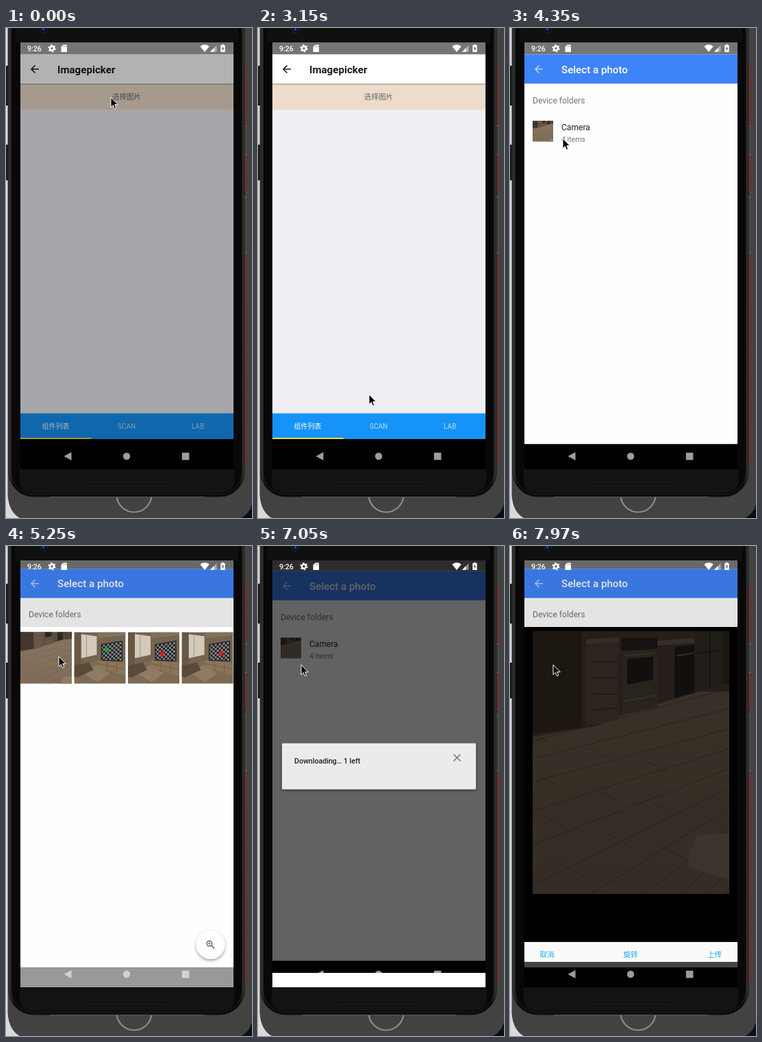
Recreate the animation shown at these times as an HTML page. Size 359 px wide and 714 px high, loop 8 s.

```html
<!DOCTYPE html>
<html lang="zh-CN">
<head>
<meta charset="utf-8">
<title>Image picker</title>
<style>
  html, body { margin: 0; width: 100%; height: 100%; overflow: hidden; background: #404040; }
  svg { display: block; width: 100%; height: 100%; }
  text { font: 12.1px Roboto, "Noto Sans CJK SC", "Noto Sans CJK", sans-serif; }
  .small { font-size: 10.6px; }
  .tab { font-size: 10px; }
  .mid { text-anchor: middle; }
  .bold { font-weight: 500; }
  .title { font-size: 15.14px; font-weight: 500; }
</style>
</head>
<body>
<svg viewBox="0 0 359 714">
  <defs>
    <clipPath id="screenClip"><rect x="21" y="21" width="311" height="622"/></clipPath>
    <clipPath id="reveal"><rect id="revealRect" x="21" y="21" width="311" height="622"/></clipPath>
    <clipPath id="rowClip"><rect x="21" y="123" width="311" height="58"/></clipPath>
    <clipPath id="sheetClip"><rect x="21" y="81" width="311" height="518"/></clipPath>
    <filter id="shadow" x="-30%" y="-30%" width="160%" height="170%">
      <feDropShadow dx="0" dy="2" stdDeviation="2.2" flood-opacity=".4"/>
    </filter>
    <pattern id="checker" width="6" height="6" patternUnits="userSpaceOnUse" patternTransform="skewY(-8)">
      <rect width="6" height="6" fill="#16171a"/>
      <path d="M0 0h3v6h3v-3h-6z" fill="#8b8c8e"/>
    </pattern>
    <linearGradient id="floorTone" x2="0" y2="1">
      <stop offset=".3" stop-color="#85735f"/><stop offset="1" stop-color="#7d6b58"/>
    </linearGradient>
    <symbol id="kitchen" viewBox="0 0 287 383">
      <rect width="287" height="383" fill="url(#floorTone)"/>
      <path id="planks" fill="none" stroke="#6a5a49" stroke-width="1.4"/>
      <path d="M227 330L240 298L287 295V362L228 345Z" fill="#8d7c69"/>
      <path d="M0 0H287V88L245 88L210 98L130 122L95 138L0 154Z" fill="#5c4b3c"/>
      <path d="M0 0H72V140L0 150Z" fill="#45362b"/>
      <path d="M78 12H126V129L90 137L78 135Z" fill="#6a5847"/>
      <path d="M90 45H124M90 68H124M90 92H124M90 115L124 112M23 0V148M50 0V144" stroke="#483a2e" stroke-width="1.6"/>
      <path d="M78 12L126 9V16L78 19ZM182 14L240 10V17L182 21Z" fill="#7d6e5c"/>
      <path d="M130 12H182V111L130 122Z" fill="#5f5346"/>
      <path d="M130 10H182V26L130 29Z" fill="#332e29"/>
      <path d="M138 41L176 37V71L138 78ZM207 23L243 19V87L207 98Z" fill="#2b2722"/>
      <path d="M134 36L179 32M133 102L180 94M210 36L241 31" stroke="#85786a" stroke-width="1.6"/>
      <path d="M236 0H278V78L236 89Z" fill="#4f453a"/>
      <path d="M259 0V83M238 32L277 28" stroke="#332b24" stroke-width="1.6"/>
      <path d="M278 0H287V78H278Z" fill="#443529"/>
    </symbol>
    <symbol id="lounge" viewBox="0 0 75 75">
      <rect width="75" height="75" fill="#75654f"/>
      <path d="M0 0H75V4L34 9V0Z" fill="#82725e"/>
      <path d="M10 3L33 6V33L10 38Z" fill="#d3cabc"/>
      <path d="M18 4V37" stroke="#a59884"/>
      <path d="M0 0H10V48L0 52Z" fill="#685744"/>
      <path d="M0 52L34 41L75 61V75H0Z" fill="#7c6a55"/>
      <path d="M12 59L32 48L52 60L34 73Z" fill="#8d7b66"/>
      <path d="M0 49L22 44L28 55L5 66L0 65Z" fill="#5b4a3a"/>
      <path d="M34 41L75 45V64L34 51Z" fill="#8b7558"/>
      <path d="M34 46L75 54M48 43V56M62 44V60" stroke="#6b5842" stroke-width=".8"/>
      <path d="M40 18L70 13V42L40 41Z" fill="url(#checker)" stroke="#1d1b1a"/>
    </symbol>
    <path id="arrow" d="M6 0H-5M.5 -5.5L-5 0L.5 5.5" fill="none" stroke-width="1.6"/>
    <path id="cross" d="M-5 -5L5 5M5 -5L-5 5" fill="none" stroke-width="1.5"/>
    <linearGradient id="edge">
      <stop stop-color="#3a3a3a"/><stop offset=".02" stop-color="#0a0a0a"/>
      <stop offset=".98" stop-color="#0a0a0a"/><stop offset="1" stop-color="#3a3a3a"/>
    </linearGradient>
  </defs>

  <!-- Device -->
  <g id="device">
    <rect width="359" height="714" fill="#424242"/>
    <path d="M0 0H2.5V680Q4 705 20 714H0Z" fill="#d9d9dc"/>
    <path d="M0 55H3V113H0ZM0 170H3V222H0Z" fill="#1c1c1c"/>
    <path d="M359 694Q355 708 343 714H359Z" fill="#071214"/>
    <path d="M350 56V240M350 330V636" stroke="#a51c1c" stroke-width="1.4"/>
    <path d="M349.5 142V185M349.5 246V328" stroke="#777" stroke-width="3"/>
    <path d="M349.5 143V184M349.5 247V327" stroke="#292929" stroke-width="1.6"/>
    <circle cx="349" cy="241" r="2" fill="#222" stroke="#777" stroke-width=".7"/>
    <circle cx="187" cy="680" r="25.5" fill="none" stroke="#8b8b8b" stroke-width="2.2"/>
    <rect x="4" y="-60" width="344" height="743" rx="36" fill="url(#edge)" stroke="#1a1a1a"/>
    <path d="M64 683.3H290" stroke="#686868" stroke-width=".8"/>
    <rect x="7.5" y="-60" width="337" height="739" rx="32" fill="#080808" stroke="#2a2a2a" stroke-width=".8"/>
    <path d="M20 643H333V664Q331 676 314 677H39Q22 676 20 664Z" fill="#131313"/>
    <path d="M14 0H339V21H14Z" fill="#101010"/>
    <rect x="113" y="662" width="125" height="5" rx="2.5" fill="#0d0d0d" stroke="#252525" stroke-width=".8"/>
    <path d="M117 664.5H235" stroke="#262626" stroke-dasharray="1 1"/>
    <circle cx="55" cy="2" r="5.5" fill="#0b1020" stroke="#20263a"/>
    <circle cx="54.5" cy="2" r="2" fill="#27408c"/>
  </g>

  <g clip-path="url(#screenClip)">
    <g id="picker">
      <rect x="21" y="0" width="311" height="38.5" fill="#757575"/>
      <rect x="21" y="38.5" width="311" height="561" fill="#efeef3"/>
      <rect x="21" y="38.5" width="311" height="42.5" fill="#fff"/>
      <use href="#arrow" x="42" y="60" stroke="#1c1c1c"/>
      <text class="title" style="font-weight:700" x="75" y="66" fill="#1c1c1c">Imagepicker</text>
      <rect x="21" y="81" width="311" height="38" fill="#eddccb"/>
      <rect x="21" y="81" width="311" height="1.5" fill="#000" opacity=".25"/>
      <text class="small mid" x="176" y="104" fill="#666">选择图片</text>
      <rect x="21" y="561.5" width="311" height="37.5" fill="#1593f8"/>
      <rect x="21" y="597" width="103.5" height="2" fill="#f0e030"/>
      <text class="tab mid" x="72.5" y="584" fill="#fff">组件列表</text>
      <text class="tab mid" x="176" y="584" fill="#fff" opacity=".7">SCAN</text>
      <text class="tab mid" x="280" y="584" fill="#fff" opacity=".7">LAB</text>
      <rect x="21" y="599" width="311" height="60"/>
      <g id="modal">
        <rect x="21" y="38.5" width="311" height="560.5" opacity=".3"/>
        <g clip-path="url(#sheetClip)"><g id="sheet">
          <rect x="21" y="389.5" width="311" height="210" fill="#fff"/>
          <rect x="21" y="552" width="311" height="6.5" fill="#f1f1f1"/>
          <text class="small mid" x="176" y="416" fill="#ccc">上传图片</text>
          <text class="mid" x="176" y="458.5" fill="#ff8f1f">删除</text>
          <text class="mid" x="176" y="497.5" fill="#555">拍照</text>
          <text class="mid" x="176" y="537" fill="#555">从图库上传</text>
          <text class="mid" x="176" y="584" fill="#555">取消</text>
        </g></g>
      </g>
    </g>

    <g id="folders">
      <rect x="21" y="0" width="311" height="39" fill="#757575"/>
      <rect x="21" y="38.5" width="311" height="568" fill="#fefefe"/>
      <rect x="21" y="38.5" width="311" height="42.5" fill="#3f83f8"/>
      <use href="#arrow" x="42" y="60" stroke="#fff" opacity=".65"/>
      <text class="title" x="75" y="65.5" fill="#fff">Select a photo</text>
      <text x="33" y="109.6" fill="#757575">Device folders</text>
      <svg x="33" y="135.5" width="30" height="30" viewBox="0 0 287 287"><use href="#kitchen" y="-48" width="287" height="383"/></svg>
      <text x="75" y="148.6" fill="#212121">Camera</text>
      <text class="small" x="75" y="166" fill="#757575">4 items</text>
      <circle id="ripple" cx="78" cy="162" opacity=".1" clip-path="url(#rowClip)"/>
      <rect x="21" y="606.5" width="311" height="60"/>
    </g>

    <g id="dialog">
      <rect x="21" y="21" width="311" height="622" opacity=".61"/>
      <rect x="35" y="287.5" width="283" height="67" rx="1" fill="#ebebeb" filter="url(#shadow)"/>
      <text class="small bold" x="53" y="316.8" fill="#212121">Downloading… 1 left</text>
      <use href="#cross" x="290.5" y="308.5" stroke="#757575"/>
    </g>

    <g id="grid">
      <rect x="21" y="0" width="311" height="39"/>
      <rect x="21" y="38.5" width="311" height="568" fill="#fefefe"/>
      <rect x="21" y="38.5" width="311" height="42.5" fill="#3f83f8"/>
      <use href="#cross" x="40.5" y="60" stroke="#fff"/>
      <text class="title" x="75" y="65.5" fill="#fff">Select a photo</text>
      <text class="small bold" x="33" y="103" fill="#212121">Today</text>
      <svg x="21" y="117.5" width="75" height="75" viewBox="0 0 287 287"><use href="#kitchen" y="-48" width="287" height="383"/></svg>
      <use href="#lounge" x="99.5" y="117.5" width="75" height="75"/>
      <use href="#lounge" x="178" y="117.5" width="75" height="75"/>
      <use href="#lounge" x="256.5" y="117.5" width="75" height="75"/>
      <circle cx="147" cy="143" r="3.2" fill="#12a135"/>
      <circle cx="228" cy="148.5" r="3.2" fill="#e01b1b"/>
      <circle cx="314" cy="148.5" r="3.2" fill="#e01b1b"/>
      <rect id="pressed" x="21" y="117.5" width="75" height="75" opacity=".2"/>
      <circle cx="298.5" cy="573" r="21" fill="#fff" filter="url(#shadow)"/>
      <g fill="none" stroke="#666" stroke-width="1.5">
        <circle cx="296.8" cy="571.2" r="3.8"/><path d="M299.6 574L304 578.4"/>
        <path d="M294.8 571.2H298.8M296.8 569.2V573.2" stroke-width="1"/>
      </g>
      <rect x="21" y="606.5" width="311" height="60" fill="#999"/>
    </g>

    <g id="viewer">
      <rect x="21" y="0" width="311" height="670"/>
      <use href="#kitchen" x="33" y="116" width="287" height="383"/>
      <rect x="33" y="116" width="287" height="383" opacity=".58"/>
      <rect x="21" y="569" width="311" height="29" fill="#fafafa"/>
      <rect x="21" y="598" width="311" height="8" fill="#444"/>
      <g class="mid" fill="#18aaf6">
        <text class="small" x="54" y="591">取消</text>
        <text class="small" x="176" y="591">旋转</text>
        <text class="small" x="298.5" y="591">上传</text>
      </g>
    </g>

    <!-- System bars -->
    <g fill="#fff">
      <text class="small bold" x="31" y="33.8">9:26</text>
      <g fill="none" stroke="#fff">
        <circle cx="67" cy="29.7" r="3" stroke-width="2.4"/>
        <circle cx="67" cy="29.7" r="4.7" stroke-width="1.8" stroke-dasharray="2.4 2.52"/>
      </g>
      <path d="M83.5 24.5H89V35H80.5V27.5Z"/>
      <path d="M84 26V28M86 26V28M88 26V28" stroke="#777" stroke-width=".7"/>
      <path d="M290 35L283.3 26.7Q290 22 296.7 26.7Z"/>
      <path d="M307.5 25V34.7H298Z" opacity=".45"/><path d="M303.5 29V34.7H298Z"/>
      <path d="M315 24H318V25H319.6V35H313.2V25H315Z"/>
      <path d="M317 26.5L314.6 30.5H316.1V33.5L318.4 29.5H317Z" fill="#666"/>
    </g>
    <g id="navIcons">
      <path d="M84.5 624L95.5 618V630Z"/>
      <circle cx="176" cy="624" r="5.2"/>
      <rect x="256.8" y="618.8" width="10.6" height="10.6"/>
    </g>
    <rect id="strip" x="21" y="622" width="311" height="21" fill="#fff"/>
  </g>
  <path id="cursor" d="M0 0V14.5L3.3 11.4L5.5 16.5L7.8 15.5L5.7 10.6H10.3Z" stroke="#fff" stroke-width="1"/>
</svg>

<script>
const LOOP = 8000, STEP = 150;
const TOP = 21, BOTTOM = 643;
const el = {};
for (const node of document.querySelectorAll('[id]')) el[node.id] = node;

const show = (node, on) => { node.style.display = on ? '' : 'none'; };
const move = (node, x, y) => node.setAttribute('transform', `translate(${x} ${y})`);

let planks = '';
for (let i = 0; i < 11; i++) {
  planks += `M0 ${160 + i * 22 + i * i * 4}L287 ${84 + i * 29}`;
  const x = (i * 83) % 240, y = 150 + i * 20;
  planks += `M${x} ${y}l${24 + i * 3} ${12 + i * 2}`;
}
el.planks.setAttribute('d', planks);

const snap = t => [7970, 7820, 7340].find(s => t >= s) ?? Math.floor(t / STEP) * STEP;

const cursorPath = [
  [0, 153, 101], [450, 153, 101], [600, 165, 150], [750, 201, 284], [900, 201, 284],
  [1500, 157, 515], [1650, 162, 534], [3450, 162, 534], [4050, 132, 151], [4200, 132, 151],
  [4350, 77, 161], [5400, 77, 161], [6000, 108, 174], [6150, 63, 173], [LOOP, 63, 173],
];

function cursorAt(t) {
  const i = cursorPath.findIndex(key => key[0] > t);
  const [t0, x0, y0] = cursorPath[i - 1], [t1, x1, y1] = cursorPath[i];
  const p = (t - t0) / (t1 - t0);
  return [x0 + (x1 - x0) * p, y0 + (y1 - y0) * p];
}

// Share of the upper page that is uncovered, per step of a transition.
const opening = age => [0.034, 0.844, 0.98][age / STEP] ?? 1;
const closing = age => [0.844, 0.034][age / STEP] ?? 0;

function pagesAt(t) {
  if (t < 3450) return ['picker', 'folders', 0];
  if (t < 5100) return ['picker', 'folders', opening(t - 3450)];
  if (t < 6900) return ['folders', 'grid', opening(t - 5100)];
  if (t < 7820) return ['folders', 'grid', closing(t - 6900)];
  return ['folders', 'viewer', opening(t - 7820)];
}

function drawPages(t) {
  const [below, above, r] = pagesAt(t);
  const moving = r > 0 && r < 1;
  for (const name of ['picker', 'folders', 'grid', 'viewer']) {
    show(el[name], (name === below && r < 1) || (name === above && r > 0));
    el[name].style.filter = '';
    el[name].removeAttribute('clip-path');
    move(el[name], 0, 0);
  }
  if (moving) {
    const shift = Math.min(25, Math.round(50 * (1 - r)));
    const clipTop = BOTTOM - Math.round((BOTTOM - TOP) * r);
    move(el[below], 0, -1.7 - 4.2 * r);
    el[below].style.filter = `brightness(${1 - 0.12 * r})`;
    move(el[above], 0, shift);
    // The clip lives in the shifted page's own coordinates.
    el.revealRect.setAttribute('y', clipTop - shift);
    el[above].setAttribute('clip-path', 'url(#reveal)');
  }
  el.navIcons.setAttribute('fill', above === 'grid' && r > 0.5 ? '#d2d2d2' : '#9c9c9c');
}

function draw(t) {
  drawPages(t);
  show(el.modal, t < 3150);
  show(el.sheet, t >= 600);
  move(el.sheet, 0, t < 750 ? 85 : 0);
  show(el.ripple, t >= 4650 && t < 5400);
  el.ripple.setAttribute('r', t < 4800 ? 90 : 300);
  show(el.pressed, t >= 6600);
  show(el.dialog, t >= 7050 && t < 7340);
  show(el.strip, t >= 7050 && t < 7200);
  move(el.cursor, ...cursorAt(t));
}

function tick(now) {
  draw(snap(now % LOOP));
  requestAnimationFrame(tick);
}
draw(0);
requestAnimationFrame(tick);
</script>
</body>
</html>
```
